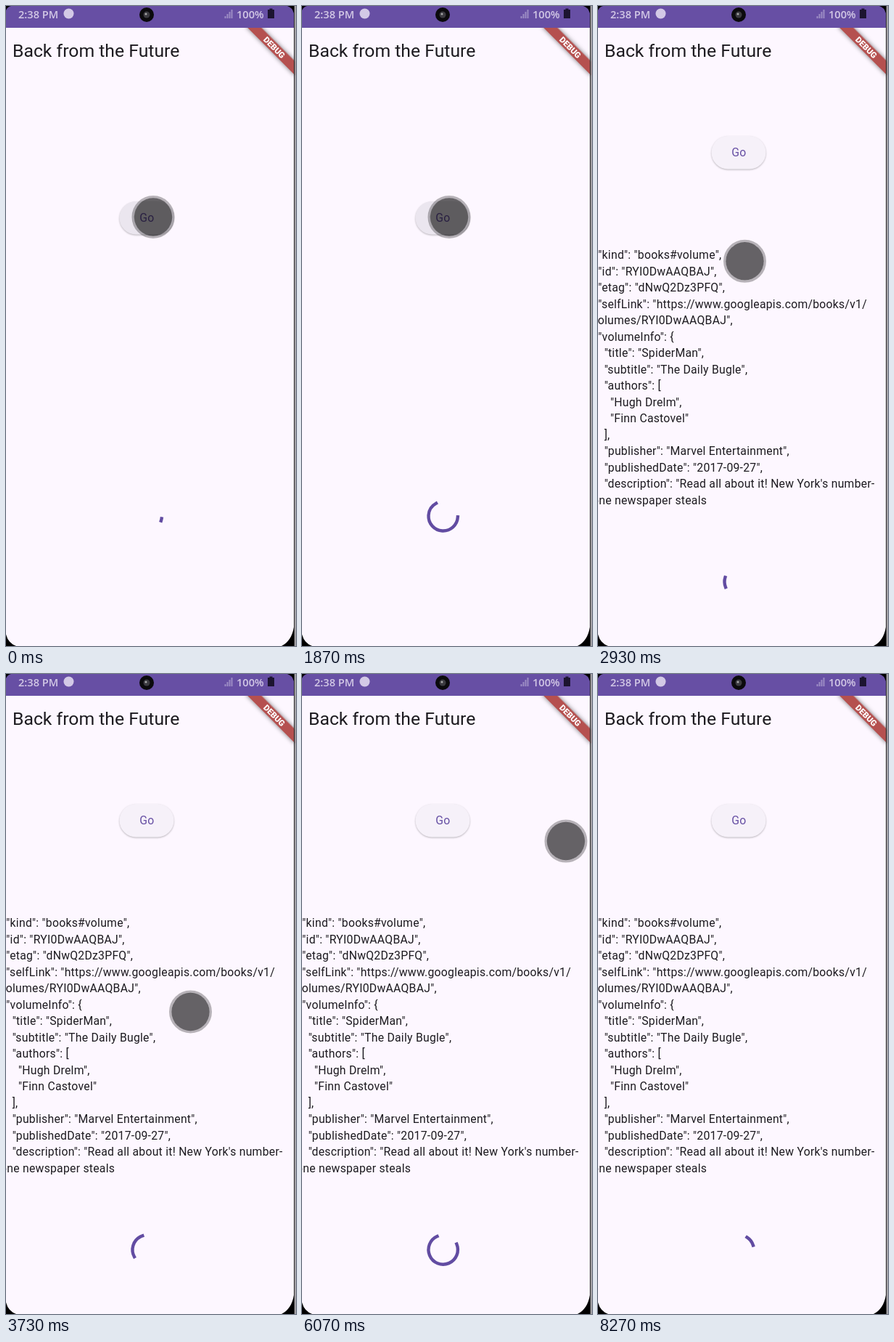
Write an HTML page that moves like this. It is 400 px wide and 881 px high and loops after 8340 ms.

```html
<!DOCTYPE html>
<html lang="en">
<head>
<meta charset="utf-8">
<title>Back from the Future</title>
<style>
  html, body { margin: 0; width: 100%; height: 100%; overflow: hidden; background: #fdf7ff; }
  svg { display: block; font-family: Roboto, sans-serif; }
  text { white-space: pre; }
  .status { font: 600 14.6px "Open Sans", "Noto Sans", sans-serif; fill: #d3c9e6; }
  #json { font-size: 15.77px; letter-spacing: .25px; fill: #1d1b20; }
  #pill { filter: drop-shadow(0 1px .8px #0004); }
  #ribbon { filter: drop-shadow(0 0 3px #0008); }
</style>
</head>
<body>
<svg width="400" height="881" viewBox="0 0 400 881">
  <rect width="400" height="881" fill="#fdf7ff"/>
  <text x="9" y="70" font-size="24.75" fill="#1d1b20">Back from the Future</text>

  <g id="button">
    <rect id="pill" x="156.5" y="-23" width="75" height="45.5" rx="22.75"/>
    <text x="194.3" y="5.3" font-size="15.77" letter-spacing=".2" text-anchor="middle" fill="#6750a4">Go</text>
  </g>
  <g id="json"></g>
  <circle id="spinner" r="20.2" pathLength="360" fill="none" stroke="#624ca2" stroke-width="4.4" stroke-linecap="square"/>

  <g transform="translate(397 30) rotate(45)">
    <rect id="ribbon" x="-48" y="31.5" width="96" height="13.5" fill="#b5504f"/>
    <text y="42.3" font-size="11.4" font-weight="900" text-anchor="middle" fill="#fff">DEBUG</text>
  </g>

  <rect width="397" height="30" fill="#674fa4"/>
  <text class="status" x="17" y="16.5">2:38 PM</text>
  <circle cx="86.5" cy="10.5" r="7" fill="#d3c9e6"/>
  <circle cx="194" cy="12" r="10" fill="#0b0a0d"/>
  <circle cx="194" cy="12" r="4.5" fill="#3b3a40"/>
  <circle cx="193" cy="11" r="1.5" fill="#aaa"/>
  <path d="M302.5 17v-3M305.5 17v-6M308.5 17v-9M311.5 17v-12" stroke="#9c8cc4" stroke-width="2"/>
  <text class="status" x="318" y="16.5">100%</text>
  <path d="M361 5h2.5v-1.5h4V5h2.5v12h-9z" fill="#1c1430"/>

  <g id="cursor">
    <circle r="27.8" fill="none" stroke="#000" stroke-opacity=".28" stroke-width="3.4"/>
    <circle r="26.2" fill-opacity=".6"/>
  </g>

  <path d="M0 0H7Q2 1 0 6zM397 0H388Q395 2 397 10zM0 865Q3 877 14 881H0zM397 855Q394 874 380 881H397z"/>
  <path d="M397 0h1.5v881h-1.5z" fill="#333"/>
  <path d="M398.5 0h1.5v881h-1.5z" fill="#a3a1a6"/>
</svg>

<script>
const LOOP = 8340, STEP = 200 / 3, LAST = 124, LOADED = 2530;
const el = id => document.getElementById(id);
const set = (id, attrs) => Object.entries(attrs).forEach(([k, v]) => el(id).setAttribute(k, v));

const lines = `  "kind": "books#volume",
  "id": "RYI0DwAAQBAJ",
  "etag": "dNwQ2Dz3PFQ",
  "selfLink": "https://www.googleapis.com/books/v1/
volumes/RYI0DwAAQBAJ",
  "volumeInfo": {
    "title": "SpiderMan",
    "subtitle": "The Daily Bugle",
    "authors": [
      "Hugh Drelm",
      "Finn Castovel"
    ],
    "publisher": "Marvel Entertainment",
    "publishedDate": "2017-09-27",
    "description": "Read all about it! New York's number-
one newspaper steals`.split("\n");
lines.forEach((line, i) => {
  const t = document.createElementNS("http://www.w3.org/2000/svg", "text");
  t.setAttribute("x", -8);
  t.setAttribute("y", 348 + i * 22.53);
  t.textContent = line;
  el("json").append(t);
});

// cursor stops: time, x, y
const stops = [
  [0, 203, 290.5], [1930, 203, 290.5], [2270, 187.5, 318.5], [2670, 187.5, 318.5],
  [3530, 254.5, 465], [3800, 254.5, 465], [4270, 264.5, 520.5], [5400, 264.5, 520.5],
  [6070, 364, 230], [6330, 435, 110], [LOOP, 435, 110]
];

function cursorAt(t) {
  const i = Math.max(1, stops.findIndex(s => s[0] > t));
  const [a, b] = [stops[i - 1], stops[i]];
  const k = Math.max(0, (t - a[0]) / (b[0] - a[0])), e = k * k * (3 - 2 * k);
  return [1, 2].map(j => a[j] + (b[j] - a[j]) * e);
}

// cubic-bezier(.4, 0, .2, 1)
function ease(x) {
  if (x <= 0 || x >= 1) return x <= 0 ? 0 : 1;
  let lo = 0, hi = 1, s;
  for (let i = 0; i < 24; i++) {
    s = (lo + hi) / 2;
    const at = 1.2 * s * (1 - s) ** 2 + .6 * s * s * (1 - s) + s ** 3;
    if (at < x) lo = s; else hi = s;
  }
  return s * s * (3 - 2 * s);
}

function arcAt(t) {
  const p = (t / 1333 + .903) % 1, turn = (t / 2222 + .343) % 1;
  const head = 270 * ease(p * 2), tail = 270 * ease(p * 2 - 1);
  return { start: tail + turn * 360 + p * 90 - 90, sweep: Math.max(head - tail, .1) };
}

function draw(now) {
  // the picture advances 15 times a second
  const n = Math.min(LAST, Math.floor((now % LOOP + 4) / STEP));
  const t = n * STEP, loaded = t >= LOADED;
  const { start, sweep } = arcAt((n || -.4) * STEP);
  set("spinner", {
    transform: `translate(194.7 ${loaded ? 792.5 : 702.3}) rotate(${start})`,
    "stroke-dasharray": `${sweep} 999`
  });
  set("button", { transform: `translate(0 ${loaded ? 202 : 292})` });
  set("pill", { fill: t < 2200 ? "#ebe6ef" : "#f6f1f9" });
  set("json", { visibility: loaded ? "visible" : "hidden" });
  set("cursor", { transform: `translate(${cursorAt(t)})` });
}

const begin = performance.now();
function tick() {
  draw(performance.now() - begin);
  requestAnimationFrame(tick);
}
tick();
</script>
</body>
</html>
```
